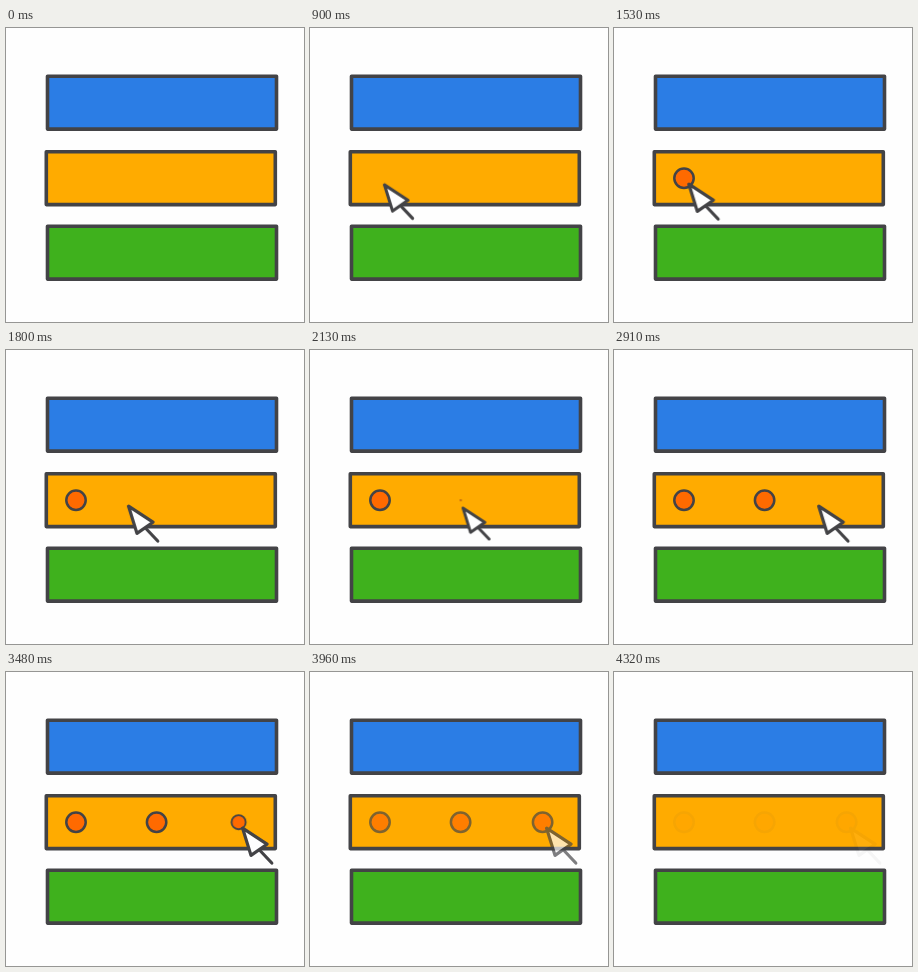
Animation of 298 by 294 pixels, one loop 4350 ms. Source, as an HTML page:

```html
<!DOCTYPE html>
<html lang="en">
<head>
<meta charset="utf-8">
<title>Placing dots on a bar</title>
<style>
  html, body { margin: 0; width: 100%; height: 100%; overflow: hidden; background: #fefefe; }
  svg { display: block; width: 298px; height: 294px; }

  .bars, .dot, .pointer { stroke: #434346; stroke-linejoin: round; stroke-linecap: round; }
  .bars { stroke-width: 3.6; }
  .dot { fill: #ff6a00; stroke-width: 2.5; transform-box: fill-box; transform-origin: center; }
  .pointer { fill: #fefefe; stroke-width: 3.2; transform-origin: 89.2px 173.5px; }

  /* One loop of 4350 ms shared by every part */
  .layer, .dot, .travel, .pointer { animation: 4350ms linear infinite both; }
  .layer { animation-name: fade; }
  .travel { animation-name: travel; }
  .pointer { animation-name: press; }
  .dot-1 { animation-name: grow-1; }
  .dot-2 { animation-name: grow-2; }
  .dot-3 { animation-name: grow-3; }

  @keyframes fade {
    0% { opacity: 0; }
    6.8966%, 86.8966% { opacity: 1; }
    100% { opacity: 0; }
  }
  @keyframes travel {
    0%, 20% { transform: translateX(-0.8px); }
    25.5172% { transform: translateX(0); }
    34.4828% { transform: translateX(0); animation-timing-function: cubic-bezier(.55, 0, .45, 1); }
    46.8966% { transform: translateX(76.7px); }
    52.4138% { transform: translateX(77.2px); }
    60% { transform: translateX(77.2px); animation-timing-function: cubic-bezier(.55, 0, .45, 1); }
    72.4138%, 100% { transform: translateX(162px); }
  }
  @keyframes press {
    0%, 20%, 25.5172%, 46.8966%, 52.4138%, 72.4138%, 77.931%, 100% { transform: scale(1); }
    22.7586%, 49.6552%, 75.1724% { transform: scale(.86); }
  }
  @keyframes grow-1 {
    0%, 22.7586% { transform: scale(0); }
    30.3448%, 100% { transform: scale(1); }
  }
  @keyframes grow-2 {
    0%, 48.2759% { transform: scale(0); }
    55.8621%, 100% { transform: scale(1); }
  }
  @keyframes grow-3 {
    0%, 74.4828% { transform: scale(0); }
    82.069%, 100% { transform: scale(1); }
  }
</style>
</head>
<body>
<svg viewBox="0 0 298 294">
  <g class="bars">
    <rect x="41.5" y="48.3" width="229" height="52.8" fill="#2b7de5"/>
    <rect x="40.3" y="123.8" width="229" height="52.8" fill="#ffab00"/>
    <rect x="41.5" y="198.3" width="229" height="52.8" fill="#3fb11d"/>
  </g>
  <g class="layer">
    <circle class="dot dot-1" cx="70" cy="150.2" r="9.7"/>
    <circle class="dot dot-2" cx="150.6" cy="150.2" r="9.7"/>
    <circle class="dot dot-3" cx="232.6" cy="150.2" r="9.7"/>
    <g class="travel">
      <g class="pointer">
        <path d="M91.5 178L103.8 191"/>
        <path d="M74.6 156.2L99 172.2L83 183.4Z"/>
      </g>
    </g>
  </g>
</svg>
</body>
</html>
```
